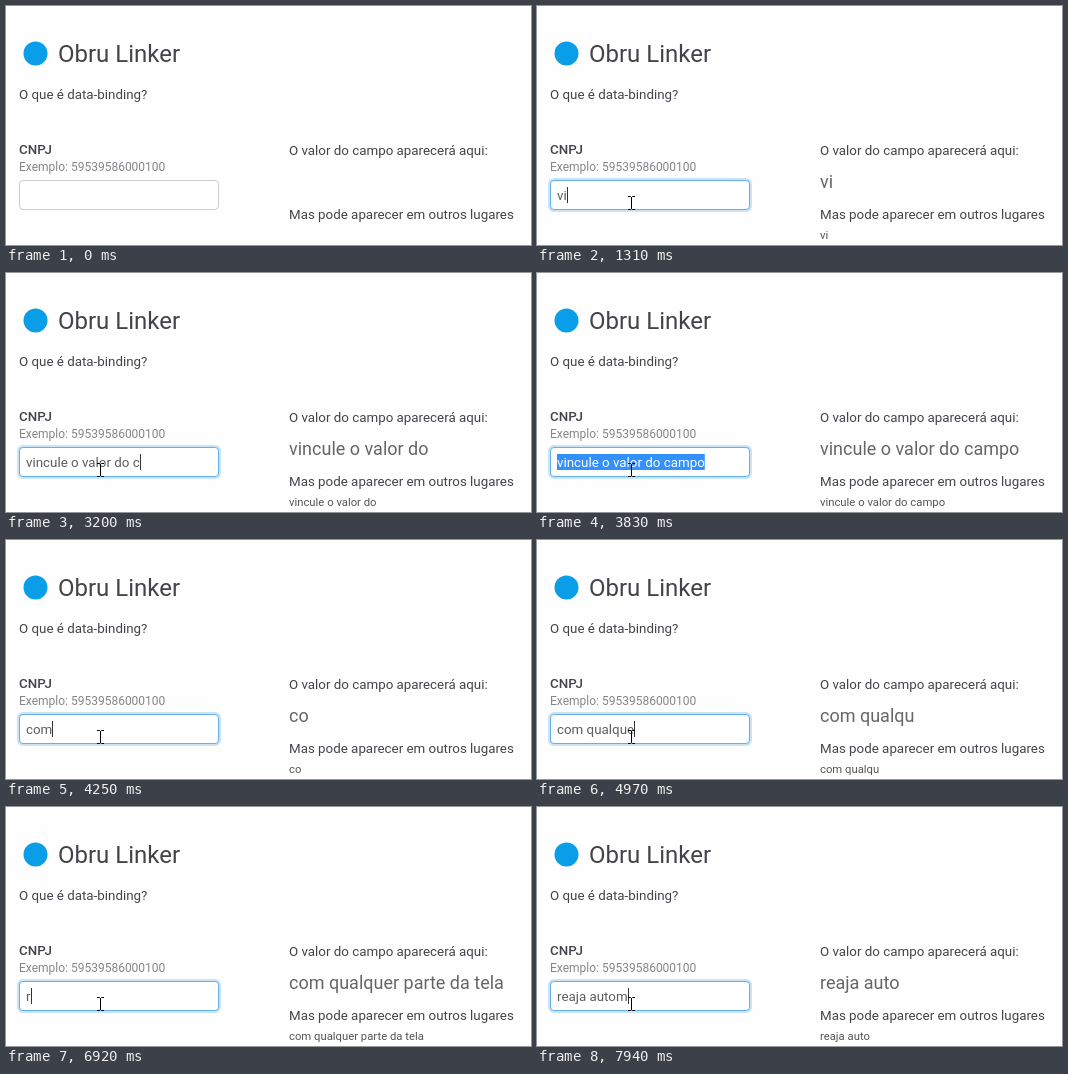
Animation, 525 px wide and 239 px high, one loop 8 s. Source, as an HTML page:

```html
<!DOCTYPE html>
<html lang="pt-BR">
<head>
<meta charset="utf-8">
<title>Data-binding</title>
<style>
  html, body { margin: 0; width: 100%; height: 100%; overflow: hidden; background: #fefefe; }
  svg { display: block; width: 525px; height: 239px; font: 13.35px Roboto, sans-serif; }
  text { fill: #43444a; white-space: pre; }
  .title { font-size: 24px; }
  .label { font-weight: 500; }
  .hint { font-size: 12px; fill: #85868a; }
  .big { font-size: 18px; fill: #666; }
  .small { font-size: 11.3px; fill: #555; }
  #value { fill: #5c5c5c; }
</style>
</head>
<body>
<svg viewBox="0 0 525 239">
  <rect width="525" height="239" fill="#fefefe"/>
  <circle cx="29.5" cy="47.5" r="12" fill="#0a9de8"/>
  <text class="title" x="52" y="56">Obru Linker</text>
  <text x="13" y="93">O que é data-binding?</text>
  <text class="label" x="13" y="148">CNPJ</text>
  <text class="hint" x="13" y="165">Exemplo: 59539586000100</text>
  <text x="283" y="149">O valor do campo aparecerá aqui:</text>
  <text class="big" id="big" x="283" y="182"></text>
  <text x="283" y="213">Mas pode aparecer em outros lugares</text>
  <text class="small" id="small" x="283" y="233"></text>

  <rect id="glow" x="12.5" y="173.5" width="201" height="31" rx="4.5" fill="none" stroke="#66afe9" stroke-opacity=".35" stroke-width="3"/>
  <rect id="box" x="13.5" y="174.5" width="199" height="29" rx="3.5" fill="#fff"/>
  <rect id="mark" x="20" y="181" height="16" fill="#3390ff"/>
  <text id="value" x="20" y="194"></text>
  <rect id="caret" y="181" width="1" height="16" fill="#333"/>
  <g id="pointer">
    <path id="arrow" d="M.5.5v16l3.7-3.5 2.4 5.5 2.4-1-2.4-5.4h5z" fill="#fff" stroke="#000"/>
    <path id="beam" d="M-3-6.5H-.5L.5-5.5 1.5-6.5H4M.5-6V6M-3 6.5H-.5L.5 5.5 1.5 6.5H4" fill="none" stroke="#000"/>
  </g>
</svg>
<script>
const LOOP = 8000, LAG = 100, FOCUS = 600;
const $ = id => document.getElementById(id);

// keys: [time, characters typed]; typing is even between two entries
const phrases = [
  { text: 'vincule o valor do campo', select: 3830,
    keys: [[890, 1], [1070, 2], [1380, 3], [1630, 5], [2400, 11], [2600, 12], [3290, 22], [3320, 23], [3400, 24]] },
  { text: 'com qualquer parte da tela', select: 6720,
    keys: [[3970, 1], [4650, 7], [4740, 8], [4850, 10], [4960, 11], [5060, 12], [5500, 16], [5700, 17], [6260, 25], [6460, 26]] },
  { text: 'reaja automático', select: Infinity,
    keys: [[6900, 1], [7300, 5], [7480, 6], [7830, 10], [7940, 11]] }
];

function typed(t) {
  const phrase = phrases.findLast(p => p.keys[0][0] <= t);
  if (!phrase) return { text: '', selected: false };
  const { keys } = phrase;
  const i = keys.findLastIndex(k => k[0] <= t);
  const [t0, n0] = keys[i];
  const [t1, n1] = keys[i + 1] || [LOOP, n0];
  const n = n0 + Math.floor((t - t0) / (t1 - t0) * (n1 - n0));
  return { text: phrase.text.slice(0, n), selected: t >= phrase.select };
}

const show = (id, on) => $(id).setAttribute('visibility', on ? 'visible' : 'hidden');

function movePointer(t) {
  const step = Math.floor((t - 100) / 90) * 90;
  const p = Math.min(1, Math.max(0, step / 450));
  const ease = 1 - (1 - p) ** 2;
  const x = Math.round(285 + (94 - 285) * ease);
  const y = Math.round(222 + (197 - 222) * ease);
  const inside = x < 213 && y < 205;
  $('pointer').setAttribute('transform', `translate(${x} ${y})`);
  show('arrow', t >= 100 && !inside);
  show('beam', t >= 100 && inside);
}

function draw(t) {
  const { text, selected } = typed(t);
  const output = typed(t - LAG).text;
  const focused = t >= FOCUS;

  $('value').textContent = text;
  $('value').style.fill = selected ? '#fff' : '';
  $('big').textContent = $('small').textContent = output;

  const width = text ? $('value').getComputedTextLength() : 0;
  $('mark').setAttribute('width', width);
  $('caret').setAttribute('x', Math.round(20 + width));
  show('mark', selected);
  show('caret', focused && !selected);
  show('glow', focused);
  $('box').setAttribute('stroke', focused ? '#66afe9' : '#ccc');
  movePointer(t);
}

const start = performance.now();
function tick() {
  draw((performance.now() - start) % LOOP);
  requestAnimationFrame(tick);
}
tick();
</script>
</body>
</html>
```
